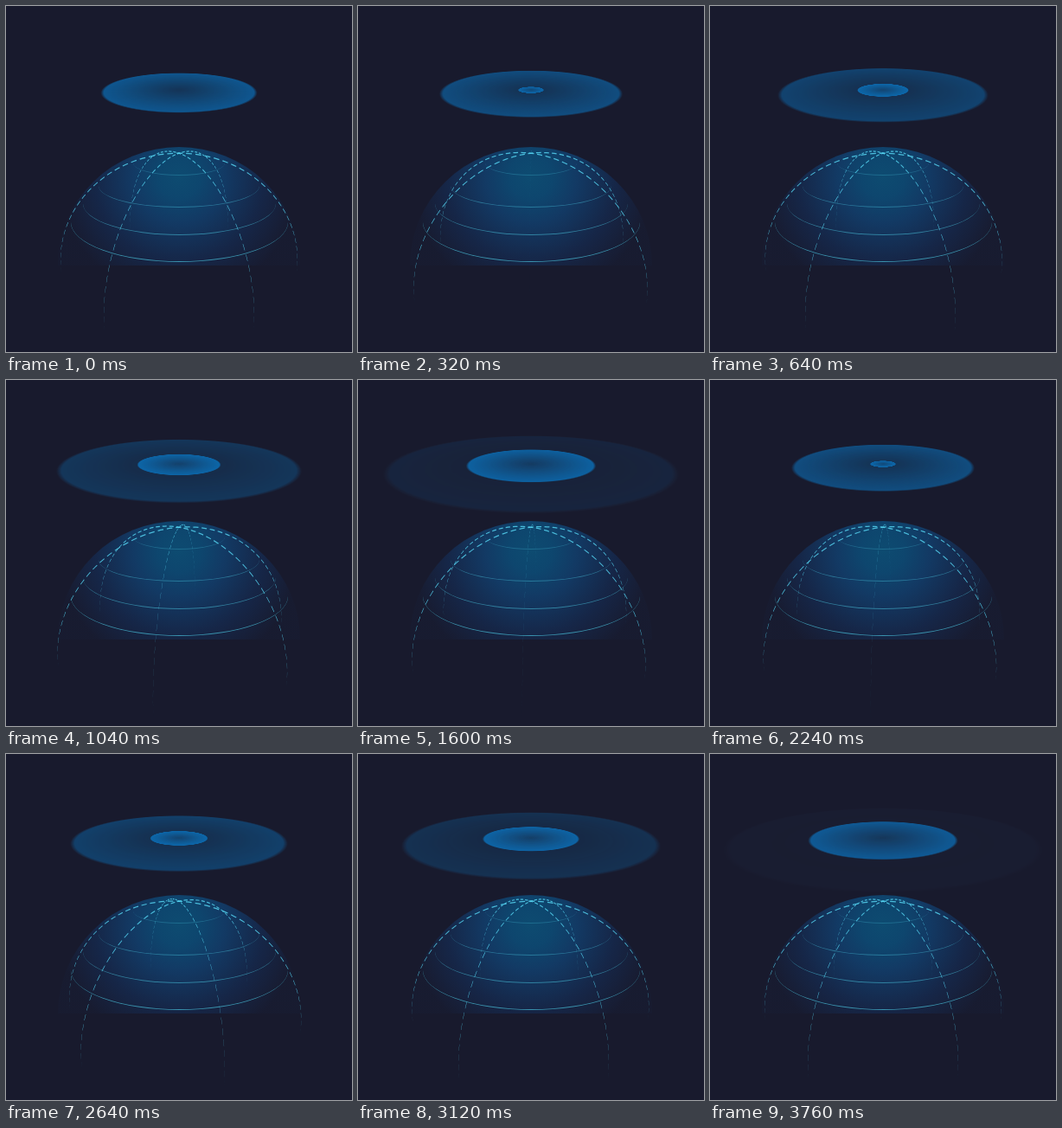
Recreate the animation shown at these times as an HTML page with a canvas. Size 400 by 400 pixels, loop 3.84 s.

```html
<!DOCTYPE html>
<html lang="en">
<head>
<meta charset="utf-8">
<title>Signal dome</title>
<style>
  html, body { margin: 0; width: 100%; height: 100%; overflow: hidden; background: #181a2d; }
  #stage { position: relative; width: 400px; height: 400px; overflow: hidden; }
  #stage > * { position: absolute; box-sizing: border-box; }
  #stage > div { border-radius: 50%; }
  #stage .dome {
    left: 60px; top: 163px; width: 280px; height: 137px;
    border-radius: 50% 50% 0 0 / 100% 100% 0 0;
    background: radial-gradient(circle 140px at 50% 25%, rgba(3, 124, 180, .5), rgba(3, 116, 178, .49) 18%, rgba(12, 95, 165, .46) 38%, rgba(16, 70, 140, .28) 70%, rgba(20, 50, 100, .06));
  }
  .ring { border-bottom: 1px solid rgb(77, 205, 230); }
  .ripple {
    left: 21px; top: -82.5px; width: 358px; height: 358px;
    background: radial-gradient(closest-side, rgba(3, 145, 240, .42), rgb(3, 145, 240) 96%, transparent);
  }
</style>
</head>
<body>
<div id="stage"><div class="dome"></div></div>
<script>
const LOOP = 3840, STEP = 80;
const RADIUS = 136, CENTER_Y = 308, DEPTH = 500, TILT = 26.7 * Math.PI / 180;
const DASH = 6 / RADIUS, GAP = 3.6 / RADIUS;
const stage = document.getElementById('stage');

function add(className, tag = 'div') {
  const el = document.createElement(tag);
  el.className = className;
  stage.append(el);
  return el;
}

// centre y, horizontal radius, vertical radius, opacity
for (const [y, rx, ry, opacity] of [[250, 125.5, 46, .65], [228.5, 111.5, 36.5, .5], [208, 93, 25, .4], [181, 53, 14.5, .25]]) {
  add('ring').style.cssText =
    `left:${200 - rx}px;top:${y - ry}px;width:${2 * rx}px;height:${2 * ry}px;opacity:${opacity}`;
}
const canvas = add('meridians', 'canvas');
canvas.width = canvas.height = 400;
const ctx = canvas.getContext('2d');
const ripples = [.5, 0].map(phase => ({ phase, el: add('ripple') }));

// Screen position of a point on a meridian, measured from the pole.
function project(azimuth, polar, radius) {
  const flat = radius * Math.sin(polar), up = radius * Math.cos(polar);
  const near = flat * Math.sin(azimuth);
  const scale = DEPTH / (DEPTH - near * Math.cos(TILT) - up * Math.sin(TILT));
  return [
    200 + flat * Math.cos(azimuth) * scale,
    CENTER_Y + (near * Math.sin(TILT) - up * Math.cos(TILT)) * scale
  ];
}

// Dashes are flat strips in the meridian's plane that taper off toward the equator.
function drawMeridian(azimuth) {
  for (let a = -Math.PI / 2; a < Math.PI / 2; a += DASH + GAP) {
    const angles = [0, .5, 1].map(k => a + k * DASH);
    const outer = angles.map(p => project(azimuth, p, RADIUS));
    const inner = angles.map(p => project(azimuth, p, RADIUS - 1.1 * Math.max(0, Math.cos(p))));
    ctx.beginPath();
    for (const point of [...outer, ...inner.reverse()]) ctx.lineTo(...point);
    ctx.fill();
  }
}

function draw(now) {
  const t = Math.floor(now % LOOP / STEP) * STEP;
  const turn = 2 * Math.PI * t / (LOOP - STEP);
  ctx.clearRect(0, 0, 400, 400);
  ctx.fillStyle = 'rgba(85, 210, 240, .85)';
  for (let i = 0; i < 3; i++) drawMeridian(turn + i * Math.PI / 3);
  for (const { phase, el } of ripples) {
    const p = (t / LOOP + phase) % 1;
    el.style.transform = `perspective(582px) rotateX(75.3deg) scale(${p})`;
    el.style.opacity = Math.min(.56, 1 - p);
  }
}

const start = performance.now();
function tick() {
  draw(performance.now() - start);
  requestAnimationFrame(tick);
}
tick();
</script>
</body>
</html>
```
